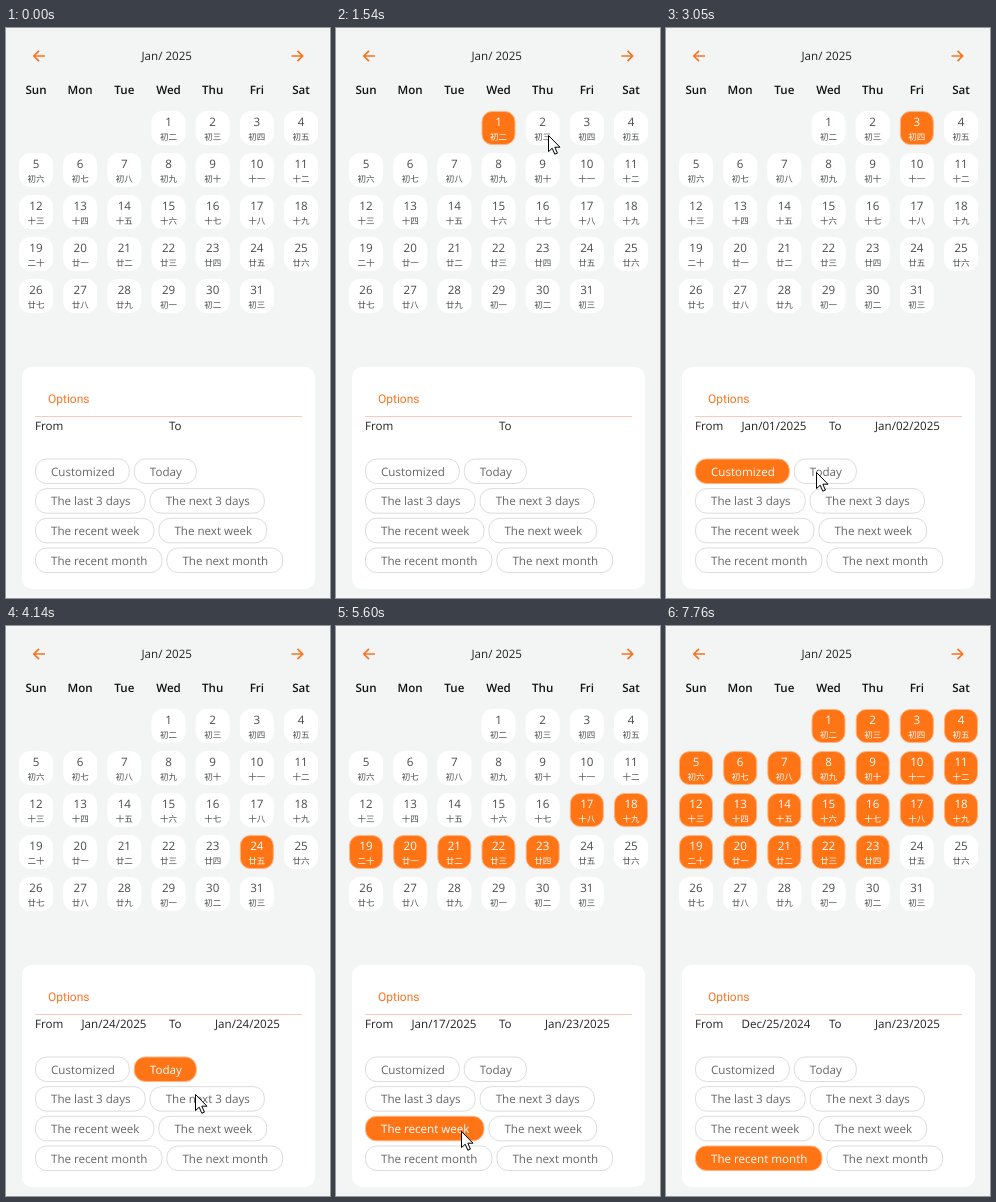
Recreate the animation shown at these times as an HTML page. Size 324 px wide and 570 px high, loop 8290 ms.

```html
<!DOCTYPE html>
<html lang="en">
<head>
<meta charset="utf-8">
<title>Date range picker</title>
<style>
html, body { margin: 0; width: 100%; height: 100%; overflow: hidden; background: #f3f5f5; }
svg {
  display: block; width: 324px; height: 570px; fill: #222;
  font: 11.6px "Open Sans", "Noto Sans", sans-serif; text-rendering: geometricPrecision;
}
.mid { text-anchor: middle; }
.week { font-weight: 600; fill: #111; }
.day rect { fill: #fff; stroke: #fff; }
.day text { fill: #484b4e; }
.day .lunar { font: 8.5px "Noto Sans CJK SC", "Noto Sans CJK", sans-serif; }
.chip rect { fill: #fff; stroke: #dcdcdc; }
.chip text { fill: #666; }
.on rect { fill: #ff7516; stroke: #ffb482; }
.on text { fill: #fff; }
.title { font: 12px Roboto, sans-serif; fill: #f87421; }
.arrow { fill: none; stroke: #f87421; stroke-width: 1.7; }
</style>
</head>
<body>
<svg viewBox="0 0 324 570">
  <path class="arrow" d="M39 28H28M33 22.8L27.8 28L33 33.2M285.5 28H296.5M291.5 22.8L296.7 28L291.5 33.2"/>
  <text class="mid" x="160.7" y="32.2">Jan/ 2025</text>
  <g id="days"></g>
  <rect x="16" y="339" width="293" height="222" rx="10" fill="#fff"/>
  <text class="title" x="42" y="375">Options</text>
  <path d="M29 388.5H296" stroke="#fcc9b9"/>
  <text x="29" y="402.2">From</text>
  <text id="from" x="75.5" y="402.2"></text>
  <text x="163" y="402.2">To</text>
  <text id="to" x="209" y="402.2"></text>
  <g id="chips"></g>
  <path id="cursor" d="M.5 .5V16.6L4.2 13.2L6.8 19.2L9.4 18.1L6.8 12.2H12Z" fill="#fff" stroke="#000"/>
</svg>
<script>
const LOOP = 8290, STEP = 48, TODAY = 24;
const $ = id => document.getElementById(id);

function add(parent, tag, attrs, text = "") {
  const el = document.createElementNS("http://www.w3.org/2000/svg", tag);
  for (const key in attrs) el.setAttribute(key, attrs[key]);
  el.textContent = text;
  parent.append(el);
  return el;
}

function lunar(day) {
  const n = day % 29 + 1;
  if (n === 10) return "初十";
  if (n === 20) return "二十";
  return "初十廿"[Math.floor(n / 10)] + "一二三四五六七八九"[n % 10 - 1];
}

// Days before the 1st fall in December
function dateText(day) {
  const [month, n, year] = day > 0 ? ["Jan", day, 2025] : ["Dec", day + 31, 2024];
  return `${month}/${String(n).padStart(2, "0")}/${year}`;
}

const colX = col => 13 + col * 44.17;
["Sun", "Mon", "Tue", "Wed", "Thu", "Fri", "Sat"].forEach((name, i) =>
  add($("days"), "text", { class: "mid week", x: colX(i) + 17, y: 65.7 }, name));

const days = Array.from({ length: 31 }, (_, i) => {
  const slot = i + 3, x = colX(slot % 7), y = 83 + Math.floor(slot / 7) * 42;
  const g = add($("days"), "g", { class: "day" });
  add(g, "rect", { x: x + .5, y: y + .5, width: 33, height: 33, rx: 10 });
  add(g, "text", { class: "mid", x: x + 17, y: y + 15.2 }, i + 1);
  add(g, "text", { class: "mid lunar", x: x + 17, y: y + 28.8 }, lunar(i + 1));
  return g;
});

// Day offsets from today for each preset
const presets = {
  "Customized": null, "Today": [0, 0],
  "The last 3 days": [-3, -1], "The next 3 days": [1, 3],
  "The recent week": [-7, -1], "The next week": [1, 7],
  "The recent month": [-30, -1], "The next month": [1, 30]
};

let chipX;
const chips = Object.keys(presets).map((label, i) => {
  if (i % 2 === 0) chipX = 29;
  const y = 430.5 + Math.floor(i / 2) * 29.67;
  const g = add($("chips"), "g", { class: "chip" });
  const box = add(g, "rect", { x: chipX + .5, y: y + .5, height: 24.5, rx: 11 });
  const text = add(g, "text", { x: chipX + 16, y: y + 17 }, label);
  const width = text.getComputedTextLength() + 31;
  box.setAttribute("width", width - 1);
  chipX += width + 4;
  return { g, label };
});

// A click is on a day number or on a preset
const clicks = [
  [1160, 1], [1730, 2], [2250, 3], [3370, "Today"],
  [4420, "The next 3 days"], [5600, "The recent week"], [6780, "The recent month"]
];

function click(state, target) {
  if (presets[target]) {
    const range = presets[target].map(offset => TODAY + offset);
    return { range, dates: range, chip: target };
  }
  if (!state.open) return { ...state, range: [target, target], open: true };
  const range = [state.range[0], target];
  return { range, dates: range, chip: "Customized" };
}

// start, end, point passed on the way, resting point
const moves = [
  [320, 890, [92, 135], [161, 103]],
  [1160, 1540, [234, 110], [212, 107]],
  [1730, 2070, [260, 110], [245, 106]],
  [2250, 3050, [146, 468], [150, 444]],
  [3620, 4140, [183, 486], [189, 468]],
  [4420, 4560, [189, 470], [189, 472]],
  [4700, 5210, [138, 499], [125, 505]],
  [6120, 6310, [126, 521], [126, 530]],
  [7620, 7760, [38, 543], [-20, 546]]
];
const ENTRY = [266, 420];

// Catmull-Rom through three evenly timed points
function along(points, u) {
  const i = u < .5 ? 0 : 1, f = u * 2 - i;
  const at = k => points[Math.max(0, Math.min(2, k))];
  return [0, 1].map(c => {
    const [a, b, d, e] = [-1, 0, 1, 2].map(k => at(i + k)[c]);
    return b + f / 2 * (d - a + f * (2 * a - 5 * b + 4 * d - e + f * (3 * (b - d) + e - a)));
  });
}

function showState(t) {
  const { range: [first, last], dates, chip } = clicks
    .filter(([time]) => time <= t)
    .reduce((state, [, target]) => click(state, target), { range: [0, 0] });
  days.forEach((g, i) => g.classList.toggle("on", i + 1 >= first && i + 1 <= last));
  chips.forEach(({ g, label }) => g.classList.toggle("on", label === chip));
  $("from").textContent = dates ? dateText(dates[0]) : "";
  $("to").textContent = dates ? dateText(dates[1]) : "";
}

function showCursor(t) {
  const visible = t >= moves[0][0] && t < moves.at(-1)[1];
  $("cursor").setAttribute("visibility", visible ? "visible" : "hidden");
  if (!visible) return;
  const i = moves.findLastIndex(([start]) => start <= t);
  const [start, end, via, rest] = moves[i];
  const origin = i ? moves[i - 1][3] : ENTRY;
  const gaps = Math.round((end - start) / STEP);
  const step = Math.floor((t - start) / (end - start) * gaps + 1e-6) + 1;
  const [x, y] = along([origin, via, rest], Math.min(1, step / (gaps + 1)));
  $("cursor").setAttribute("transform", `translate(${x.toFixed(1)} ${y.toFixed(1)})`);
}

function draw() {
  const t = performance.now() % LOOP;
  showState(t);
  showCursor(t);
  requestAnimationFrame(draw);
}
draw();
</script>
</body>
</html>
```
